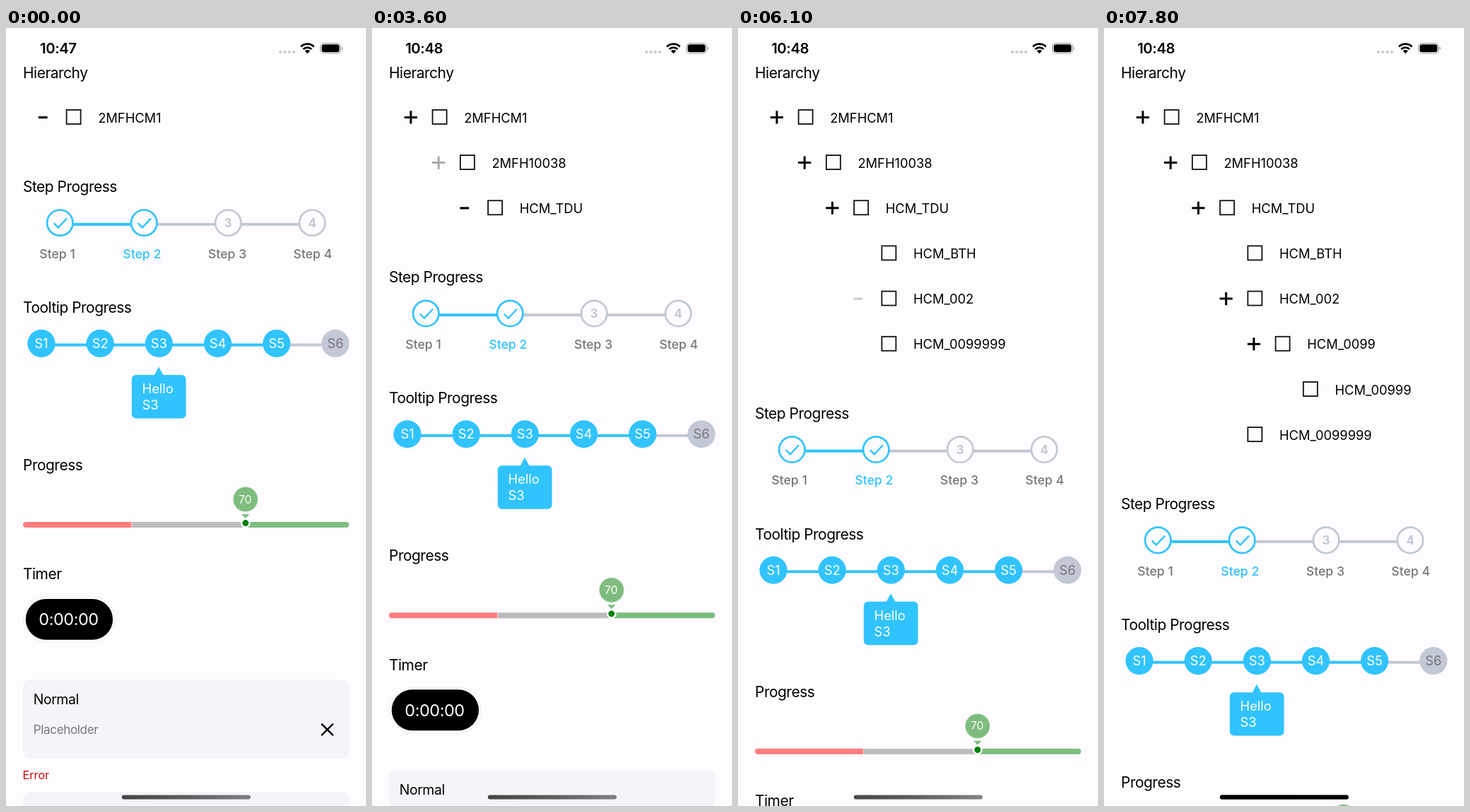
Animation, 509 px wide and 1101 px high, one loop 8 s. Source, as an HTML page:

```html
<!DOCTYPE html>
<html lang="en">
<head>
<meta charset="utf-8">
<title>Component list</title>
<style>
  html, body { margin: 0; width: 100%; height: 100%; overflow: hidden; background: #fefcff; }
  svg { display: block; width: 509px; height: 1101px; font-family: Inter, Roboto, sans-serif; font-size: 18.3px; }
  .head { font-size: 20.9px; letter-spacing: -.022em; }
  .step { font-size: 17.6px; font-weight: 500; }
  .num { font-size: 17px; font-weight: 700; }
  .mid { text-anchor: middle; }
  .label { font-size: 19.4px; letter-spacing: -.022em; }
  .hint { font-size: 17px; letter-spacing: -.02em; }
  .clock { font-size: 20.3px; font-weight: 600; letter-spacing: -.02em; }
  .timer { font-size: 23.5px; letter-spacing: -.02em; }
</style>
</head>
<body>
<svg id="stage" viewBox="0 0 509 1101">
  <defs>
    <linearGradient id="bar">
      <stop offset="0" stop-opacity=".72"/>
      <stop offset=".5" stop-opacity=".62"/>
      <stop offset="1" stop-opacity=".48"/>
    </linearGradient>
  </defs>
</svg>
<script>
const LOOP = 8000, STEP = 100, ROW = 64.17, INDENT = 39.25, FADE = 250;
const BLUE = '#31c3fd', GREY = '#c2c8d5', TEXT = '#777578', GREEN = '#7ebd7e';
const stage = document.getElementById('stage');

// shown, press: when the row appears and is touched; open: when its children appear; ease: start of the icon's fade-in
const rows = [
  { name: '2MFHCM1', depth: 0, shown: 0, press: 2200, open: 2400, ease: 2366 },
  { name: '2MFH10038', depth: 1, shown: 2400, press: 3400, open: 3600, ease: 3529 },
  { name: 'HCM_TDU', depth: 2, shown: 3600, press: 4800, open: 4900, ease: 4890 },
  { name: 'HCM_BTH', depth: 3, shown: 4900 },
  { name: 'HCM_002', depth: 3, shown: 4900, press: 6100, open: 6300, ease: 6250 },
  { name: 'HCM_0099', depth: 4, shown: 6300, press: 7500, open: 7600, ease: 7550 },
  { name: 'HCM_00999', depth: 5, shown: 7600 },
  { name: 'HCM_0099999', depth: 3, shown: 4900 }
];

function add(parent, tag, attrs = {}, content) {
  const el = document.createElementNS('http://www.w3.org/2000/svg', tag);
  for (const key in attrs) el.setAttribute(key, attrs[key]);
  if (content !== undefined) el.textContent = content;
  parent.append(el);
  return el;
}
const text = (g, x, y, str, cls = '', fill = '#000') => add(g, 'text', { x, y, class: cls, fill }, str);
const rect = (g, x, y, width, height, fill, rx = 0) => add(g, 'rect', { x, y, width, height, fill, rx });
const disc = (g, cx, cy, r, fill) => add(g, 'circle', { cx, cy, r, fill });
const path = (g, d, fill) => add(g, 'path', { d, fill });
const line = (g, d, stroke, width) => add(g, 'path', { d, stroke, fill: 'none', 'stroke-width': width });

function drawRow(row) {
  row.group = add(stage, 'g');
  const g = add(row.group, 'g', { transform: `translate(${row.depth * INDENT} 0)` });
  if (row.press) {
    row.minus = rect(g, 45.8, 125, 12.8, 3.1, '#000');
    row.plus = line(g, 'M45.8 126.4H64M54.9 117.3V135.5', '#000', 3);
  }
  add(g, 'rect', { x: 85.6, y: 115.9, width: 20, height: 20, fill: 'none', stroke: '#111', 'stroke-width': 1.8 });
  text(g, 130.2, 133.6, row.name);
}

function drawSteps(g) {
  text(g, 24, 232, 'Step Progress', 'head');
  for (let i = 0; i < 4; i++) {
    const x = 76.3 + i * 118.9, done = i < 2, color = done ? BLUE : GREY;
    if (i < 3) rect(g, x + 19, 275.8, 81, 4, i ? GREY : BLUE);
    add(g, 'circle', { cx: x, cy: 275.7, r: 18.2, fill: '#fefcff', stroke: color, 'stroke-width': 2.7 });
    if (done) line(g, `M${x - 8.5} 276.2l6 6.2 12.3-13`, BLUE, 2.4);
    else text(g, x, 281.8, i + 1, 'num mid', GREY);
    text(g, [47.3, 165.3, 285.8, 406.3][i], 325.6, 'Step ' + (i + 1), 'step', i === 1 ? BLUE : TEXT);
  }
}

function drawTooltip(g) {
  text(g, 24, 402.8, 'Tooltip Progress', 'head');
  for (let i = 0; i < 6; i++) {
    const x = 50 + i * 83.15, last = i === 5;
    if (!last) rect(g, x + 18, 446.5, 47, 4, i === 4 ? GREY : BLUE);
    disc(g, x, 446.4, 19.6, last ? GREY : BLUE);
    text(g, x, 453, 'S' + (i + 1), 'mid', last ? TEXT : '#fff');
  }
  path(g, 'M209.5 491.5L216 479.5L222.5 491.5Z', BLUE);
  rect(g, 177.8, 491, 76.7, 61.4, BLUE, 6);
  text(g, 192.6, 517, 'Hello', '', '#fff');
  text(g, 192.6, 539.8, 'S3', '', '#fff');
}

function drawProgress(g) {
  text(g, 24, 625.8, 'Progress', 'head');
  path(g, 'M177.3 699V707H28a4 4 0 0 1 0-8Z', '#ff7d7d');
  rect(g, 178, 699, 161, 8, '#bebbbe');
  path(g, 'M338.7 699H481a4 4 0 0 1 0 8H338.7Z', GREEN);
  disc(g, 338.7, 667, 18.9, '#f1f4f1');
  disc(g, 338.7, 667, 17.2, GREEN);
  text(g, 338.2, 672.6, '70', 'mid', '#fff').style.fontSize = '15.7px';
  path(g, 'M333 688H344.5L338.7 693.7Z', GREEN);
  disc(g, 338.7, 700.6, 6.9, '#fff');
  disc(g, 338.7, 700.6, 4.5, '#07810b');
}

function drawTimer(g) {
  text(g, 24, 780.2, 'Timer', 'head');
  add(g, 'rect', { x: 24.4, y: 804.4, width: 129.8, height: 65, rx: 32.5, fill: '#fff', stroke: '#eeecef', 'stroke-width': .9 });
  rect(g, 27.8, 808, 123.2, 57.8, '#000', 28.9);
  text(g, 46.3, 845.3, '0:00:00', 'timer', '#fff');
}

function drawFields(g) {
  rect(g, 24, 922, 461, 112.3, '#f5f4f8', 10);
  text(g, 38.8, 956.5, 'Normal', 'label');
  text(g, 38.8, 998.6, 'Placeholder', 'hint', '#79777b');
  line(g, 'M446 984.6L462.6 1001.2M462.6 984.6L446 1001.2', '#000', 2.5);
  text(g, 23.5, 1063.3, 'Error', '', '#c70a0a').style.fontSize = '16.2px';
  rect(g, 24, 1081, 461, 112, '#f5f4f8', 10);
}

function drawStatus(g) {
  for (let i = 0; i < 4; i++) disc(g, 388 + i * 6.3, 34, 2.1, '#cac8cb');
  path(g, 'M426.2 36.2l-3.6-3.7a5.2 5.2 0 0 1 7.2 0Z', '#000');
  line(g, 'M420.3 30.1a8.5 8.5 0 0 1 11.8 0', '#000', 2.8);
  line(g, 'M417 26.4a13.3 13.3 0 0 1 18.4 0', '#000', 2.8);
  add(g, 'rect', { x: 444.6, y: 21.6, width: 28.6, height: 14.4, rx: 4.6, fill: 'none', stroke: '#a5a3a6', 'stroke-width': 1.2 });
  rect(g, 446.4, 23.3, 25, 11, '#000', 3.2);
  path(g, 'M474.6 26.4a2.7 2.7 0 0 1 0 4.9Z', '#a5a3a6');
}

text(stage, 24, 70.6, 'Hierarchy', 'head');
rows.forEach(drawRow);
const page = add(stage, 'g');
[drawSteps, drawTooltip, drawProgress, drawTimer, drawFields].forEach(draw => draw(page));
const clock = text(stage, 48, 36.2, '10:47', 'clock');
drawStatus(stage);
rect(stage, 163.8, 1085.6, 182, 5.8, 'url(#bar)', 2.9);
const solid = rect(stage, 163.8, 1085.6, 182, 5.8, '#000', 2.9);

const show = (el, on) => el.setAttribute('display', on ? 'inline' : 'none');
const clamp = v => Math.min(1, Math.max(0, v));
const ease = p => p < .5 ? 2 * p * p : 1 - 2 * (1 - p) ** 2;

function render(t) {
  let count = 0;
  for (const row of rows) {
    const visible = t >= row.shown;
    show(row.group, visible);
    if (!visible) continue;
    row.group.setAttribute('transform', `translate(0 ${count++ * ROW})`);
    if (!row.press) continue;
    const open = t >= row.open;
    show(row.minus, !open);
    show(row.plus, open);
    row.minus.setAttribute('opacity', t >= row.press ? .2 : 1);
    row.plus.setAttribute('opacity', .2 + .8 * ease(clamp((t - row.ease) / FADE)));
  }
  page.setAttribute('transform', `translate(0 ${(count - 1) * ROW})`);
  clock.textContent = t < 600 ? '10:47' : '10:48';
  clock.setAttribute('x', t < 600 ? 48 : 47.2);
  solid.setAttribute('opacity', clamp((t - 7500) / 300));
}

const start = performance.now();
function tick() {
  const t = (performance.now() - start) % LOOP;
  render(Math.floor(t / STEP) * STEP);
  requestAnimationFrame(tick);
}
tick();
</script>
</body>
</html>
```
